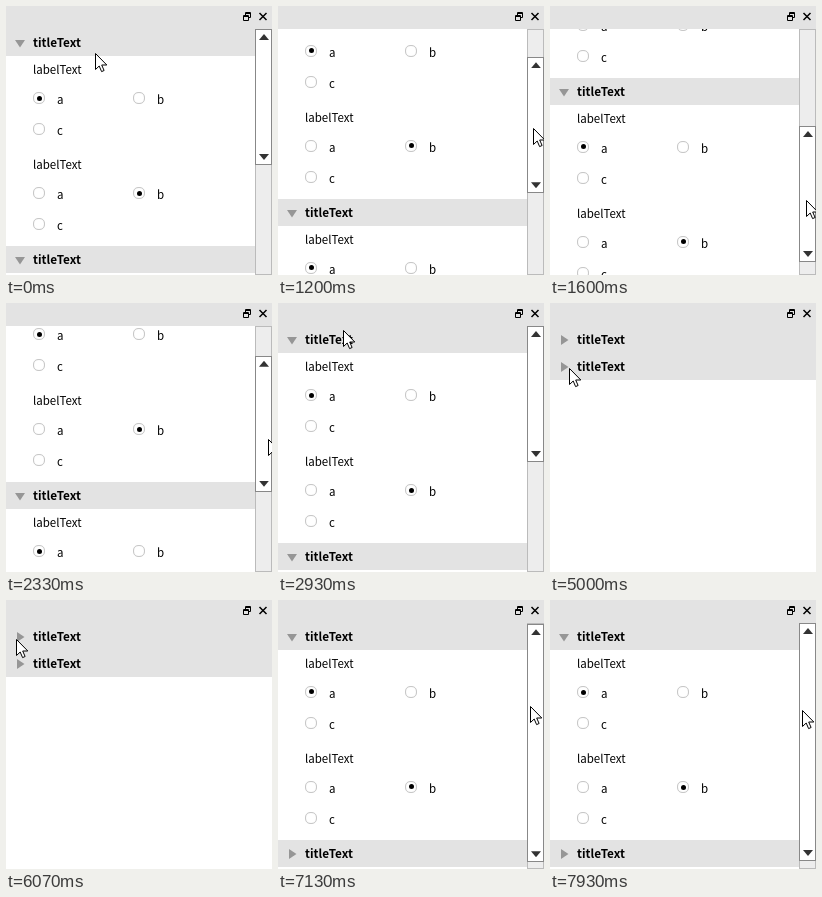
Animation, 266 px wide and 269 px high, one loop 8 s. Source, as an HTML page:

```html
<!DOCTYPE html>
<html lang="en">
<head>
<meta charset="utf-8">
<title>Collapsible dock panel</title>
<style>
  html, body { margin: 0; width: 100%; height: 100%; overflow: hidden; background: #fff; }
  #stage { position: relative; width: 266px; height: 269px; overflow: hidden; background: #fff;
    font: 11.5px/20px "Noto Sans CJK SC", "Noto Sans", sans-serif; color: #000; }
  #stage * { box-sizing: border-box; }
  .bar, .view, .scroll, .thumb, .cursor, .icon, .label, .opt { position: absolute; }

  .bar { left: 0; top: 0; width: 266px; height: 23px; background: #e3e3e3; }
  .icon { left: 236px; top: 6px; }

  .view { left: 0; top: 23px; width: 266px; height: 246px; overflow: hidden; }
  .list { position: relative; animation: scroll 8s linear infinite; }
  .head { position: relative; height: 27px; padding: 3px 0 0 27px; background: #e3e3e3;
    font-size: 11.75px; font-weight: 700; }
  .head svg { position: absolute; left: 9px; top: 9px; }
  .body { position: relative; height: 190px; overflow: hidden; }
  .label { left: 27px; }
  .opt { padding-left: 24px; }
  .opt i { position: absolute; left: 0; top: 3px; width: 12px; height: 12px;
    border: 1.5px solid #c8c8c8; border-radius: 5px; background: #fff; box-shadow: inset 0 0 1px #ccc; }
  .opt.on i::after { content: ""; position: absolute; left: 50%; top: 50%; width: 5px; height: 5px;
    margin: -2.5px; border-radius: 50%; background: #000; }

  .first .body { animation: fold1 8s step-end infinite; }
  .first svg { animation: turn1 8s step-end infinite; }
  .second .body { animation: fold2 8s step-end infinite; }
  .second svg { animation: turn2 8s step-end infinite; }

  .scroll { left: 249px; top: 23px; width: 17px; height: 246px; background: #ededed;
    border: 1px solid #bbb; animation: bar 8s step-end infinite; }
  .thumb { left: -1px; width: 17px; top: -1px; height: 136px; background: #fff; border: 1px solid #888;
    animation: size 8s step-end infinite, thumb 8s linear infinite; }
  .thumb::before, .thumb::after { content: ""; position: absolute; left: 3px; width: 10px; height: 6px; background: #333; }
  .thumb::before { top: 4px; clip-path: polygon(50% 0, 100% 100%, 0 100%); }
  .thumb::after { bottom: 4px; clip-path: polygon(0 0, 100% 0, 50% 100%); }

  .cursor { left: 89px; top: 47px; animation: move 8s linear infinite; }

  @keyframes scroll {
    0%, 12.5% { top: 0; }
    15% { top: -47px; }
    20% { top: -168px; }
    22.5%, 25.5% { top: -198px; }
    29.125% { top: -61px; }
    31%, 89% { top: 0; }
    92.5%, 95.8% { top: -8px; }
    98.8%, 100% { top: 0; }
  }
  @keyframes thumb {
    0%, 12.1% { top: -1px; }
    15% { top: 27px; }
    20% { top: 96px; }
    21.8%, 25.2% { top: 109px; }
    29.125% { top: 29px; }
    30.5%, 88.6% { top: -1px; }
    92%, 95.3% { top: 7px; }
    98.3%, 100% { top: -1px; }
  }
  @keyframes size { 0% { height: 136px; } 40%, 100% { height: 238px; } }
  @keyframes bar { 0% { visibility: visible; } 59.17% { visibility: hidden; } 78.33%, 100% { visibility: visible; } }
  @keyframes fold1 { 0% { height: 190px; } 40% { height: 0; } 78.33%, 100% { height: 190px; } }
  @keyframes turn1 { 0% { transform: none; } 40% { transform: rotate(-90deg); } 78.33%, 100% { transform: none; } }
  @keyframes fold2 { 0% { height: 190px; } 59.17%, 100% { height: 0; } }
  @keyframes turn2 { 0% { transform: none; } 59.17%, 100% { transform: rotate(-90deg); } }
  @keyframes move {
    0% { left: 89px; top: 47px; }
    6.6%, 8% { left: 248px; top: 86px; }
    9.1%, 11.8% { left: 255px; top: 90px; }
    15% { left: 255px; top: 122px; }
    20% { left: 256px; top: 194px; }
    22.5% { left: 255px; top: 219px; }
    23.4%, 25% { left: 257px; top: 222px; }
    29.125% { left: 262px; top: 136px; }
    31.5% { left: 258px; top: 92px; }
    36% { left: 90px; top: 24px; }
    38%, 40.5% { left: 10px; top: 34px; }
    46.6% { left: 200px; top: 72px; }
    50% { left: 260px; top: 92px; }
    52.5% { left: 256px; top: 114px; }
    57.5%, 59.6% { left: 9px; top: 60px; }
    68.4% { left: 38px; top: 74px; }
    72.5% { left: 2px; top: 50px; }
    75.8%, 78.6% { left: 10px; top: 39px; }
    87.5%, 88.6% { left: 252px; top: 104px; }
    92%, 95% { left: 253px; top: 118px; }
    98.5%, 100% { left: 252px; top: 110px; }
  }
</style>
</head>
<body>
<div id="stage">
  <div class="view">
    <div class="list" id="list"></div>
  </div>
  <div class="scroll"><div class="thumb"></div></div>
  <div class="bar">
    <svg class="icon" width="26" height="10" fill="none" stroke="#000">
      <path d="M3.500 3V.5h5v5H7M3 1.500h6M1.500 3.500h5v5h-5zM1 4.500h6"/>
      <path d="M17.500 1l7 7m0-7l-7 7" stroke-width="1.5"/>
    </svg>
  </div>
  <svg class="cursor" width="13" height="20">
    <path d="M.5.5v16l3.7-3.5 2.4 5.6 2.5-1.1-2.4-5.5h5.1z" fill="#fff" stroke="#000"/>
  </svg>
</div>
<script>
  // Option positions are relative to each group's label.
  const option = (name, x, y, on) =>
    `<div class="opt${on ? " on" : ""}" style="left:${x}px;top:${y}px"><i></i>${name}</div>`;

  const group = (y, picked) =>
    `<div class="label" style="top:${y}px">labelText</div>` +
    [["a", 27, 30], ["b", 127, 30], ["c", 27, 61]]
      .map(([name, x, dy]) => option(name, x, y + dy, name === picked)).join("");

  const section = cls =>
    `<div class="${cls}">
      <div class="head"><svg width="10" height="10"><path d="M0 2h10L5 9.500z" fill="#969696"/></svg>titleText</div>
      <div class="body">${group(3, "a")}${group(98, "b")}</div>
    </div>`;

  document.getElementById("list").innerHTML = section("first") + section("second");
</script>
</body>
</html>
```
